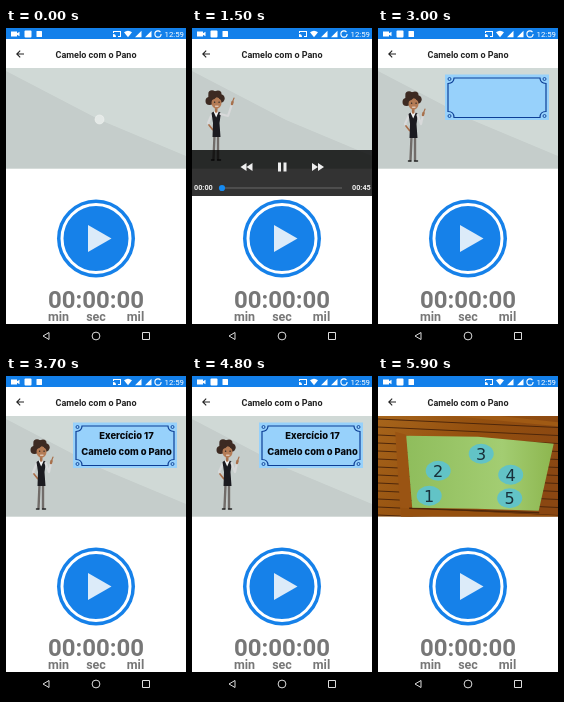
Write an HTML page that moves like this. It is 180 by 320 pixels and loops after 6 s.

```html
<!DOCTYPE html>
<html lang="pt">
<head>
<meta charset="utf-8">
<title>Camelo com o Pano</title>
<style>
html, body { margin: 0; width: 100%; height: 100%; overflow: hidden; background: #fff; }
svg { display: block; width: 100vw; height: 100vh; font-family: Roboto, sans-serif; }
.bold { font-weight: 700; }
.card { font: 800 9.4px Inter, sans-serif; text-anchor: middle; fill: #05080c; }
.time { font-weight: 700; font-size: 7.3px; fill: #eee; }
.num { font: 400 16px "DejaVu Sans", sans-serif; text-anchor: middle; fill: #18303a; }
</style>
</head>
<body>
<svg viewBox="0 0 180 320">
  <defs>
    <clipPath id="frame"><path d="M0 40H180V140.500H0z"/></clipPath>
    <linearGradient id="paper">
      <stop stop-color="#8fbd5c"/><stop offset=".65" stop-color="#a3cd72"/><stop offset="1" stop-color="#8db64f"/>
    </linearGradient>
    <linearGradient id="wood" x2="1" y2=".4">
      <stop stop-color="#a8661c"/><stop offset=".5" stop-color="#94500f"/><stop offset="1" stop-color="#8a4712"/>
    </linearGradient>
  </defs>
  <path fill="#fff" d="M0 0H180V320H0z"/>

  <!-- status bar -->
  <path fill="#1380ea" d="M0 0H180V11H0z"/>
  <g fill="#fff">
    <path d="M5 3.5h6v1.7l2.5-1.5v4.6l-2.5-1.5v1.7h-6z"/>
    <rect x="18.500" y="2.500" width="7" height="7" rx="1"/>
    <rect x="30.500" y="3" width="5.500" height="6" rx=".5"/>
    <path d="M107 3h8v6h-3v-1h2V4h-6v1h-1zM107 6a3 3 0 0 1 3 3h-3z"/>
    <path id="wifi" d="M118 4.200q4-3 8 0L122 9.300z"/>
    <path d="M129 9.200l6.500-6.500v6.500zM139 9.200l6.500-6.500v6.500z"/>
    <circle cx="152" cy="6" r="3.100" fill="none" stroke="#fff" stroke-width="1.100" stroke-dasharray="17 3"/>
    <text x="158.500" y="8.800" font-size="7.800">12:59</text>
  </g>

  <!-- header -->
  <path d="M18 26H11M14.200 22.600L10.800 26l3.400 3.400" fill="none" stroke="#222" stroke-width="1.100"/>
  <text class="bold" x="90" y="29.500" font-size="9" text-anchor="middle" fill="#222">Camelo com o Pano</text>

  <!-- video -->
  <g clip-path="url(#frame)">
    <g id="room">
      <path fill="#d0d9d6" d="M0 40H180V141H0z"/>
      <path fill="#c5cdcb" d="M0 43L94 92 180 128V141H0z"/>
      <g id="panel">
        <path fill="#97d1fb" d="M67 46.500H171V92H67z"/>
        <g id="border" fill="none" stroke="#0d3f96" stroke-width="1.200">
          <path d="M76 50H162q0 5 6 5.500V83.500q-6 0-6 6H76q0-6-6-6V55.500q6-.5 6-5.500z"/>
          <g stroke-width=".900">
            <circle cx="71.500" cy="51" r="1.500"/><circle cx="166.500" cy="51" r="1.500"/>
            <circle cx="71.500" cy="88" r="1.500"/><circle cx="166.500" cy="88" r="1.500"/>
          </g>
        </g>
        <text id="line1" class="card" x="120.500" y="62.500">Exercício 17</text>
        <text id="line2" class="card" x="120.500" y="79">Camelo com o Pano</text>
      </g>
      <g id="woman" stroke-linecap="round" stroke-linejoin="round" fill="none">
        <path d="M22.500 108L21.500 131M26 108L26 131" stroke="#716c69" stroke-width="2.400"/>
        <path d="M19.500 132h2.500M25.500 132h3" stroke="#222" stroke-width="1.500"/>
        <path d="M20 86L16 95L20 101" stroke="#d8d9da" stroke-width="2.200"/>
        <path d="M17 97l3.500 4.500" stroke="#a8704c" stroke-width="1.800"/>
        <path fill="#f0f0f0" d="M20 84.500l4-2 4.500 2v6h-8z"/>
        <path fill="#1b1b20" d="M19.500 85l2-1.500 2.700 6 2.600-6 2.200 1.500-1.500 10 1 14h-8l.5-14z"/>
        <path d="M24.200 79v4.500" stroke="#a8704c" stroke-width="2.600"/>
        <g fill="#3d2a22">
          <circle cx="23" cy="70" r="7"/><circle cx="17.500" cy="73" r="4"/>
          <circle cx="28.500" cy="70.500" r="4.200"/><circle cx="20" cy="66" r="3.700"/>
          <circle cx="26" cy="66" r="3.500"/>
        </g>
        <ellipse cx="24.500" cy="75" rx="5" ry="5.800" fill="#b47b55"/>
        <path d="M19.500 72q4-1 6-4q1 3 4.500 4l-1-5-6-2z" fill="#3d2a22"/>
        <path d="M22.500 74.200h.2M27 74.200h.2" stroke="#222" stroke-width="1.300"/>
        <path d="M23.500 78.200h2.600" stroke="#fff" stroke-width=".8"/>
        <path id="sleeve" stroke="#d8d9da" stroke-width="2.200"/>
        <path id="hand" stroke="#a8704c" stroke-width="2.400"/>
        <path id="finger" stroke="#a8704c" stroke-width="1.100"/>
      </g>
    </g>
    <g id="photo">
      <path fill="url(#wood)" d="M-5 35H185V146H-5z"/>
      <g id="slats" stroke="#4f270a" stroke-width="1.100"></g>
      <path fill="#a05a14" d="M-5 38L60 38 185 50V46L80 35H-5z"/>
      <path fill="#9a5413" d="M16 55L27 58 34 146H22z"/>
      <path fill="#95500f" d="M22 131L185 139V146H22z"/>
      <path d="M30 131.500L160 136" stroke="#4f270a" stroke-width="1.500"/>
      <path fill="url(#paper)" d="M27 59L99 60 174.500 67 159.500 134 98 132 33 131z"/>
      <g id="discs"></g>
    </g>
    <circle id="touch" cx="93.500" cy="91.500" r="4.500" fill="#e4e9e7" stroke="#f2f4f3" stroke-width=".5"/>
  </g>

  <!-- player controls -->
  <g id="controls">
    <path opacity=".8" d="M0 122H180V168H0z"/>
    <g fill="#eee">
      <path d="M54.500 135v8l-6-4zM60.500 135v8l-6-4zM120 135v8l6-4zM126 135v8l6-4z"/>
      <path d="M86 134.500h3v9h-3zM91.500 134.500h3v9h-3z"/>
    </g>
    <path d="M30 160H150" stroke="#686868"/>
    <path id="played" stroke="#1683e8" stroke-width="1.200"/>
    <circle id="knob" cy="160" r="3.100" fill="#168af0"/>
    <text id="clock" class="time" x="2" y="162">00:00</text>
    <text class="time" x="160" y="162">00:45</text>
  </g>

  <!-- start button and stopwatch -->
  <circle cx="90" cy="210.500" r="39" fill="#1681e9"/>
  <circle cx="90" cy="210.500" r="34" fill="none" stroke="#fff" stroke-width="3"/>
  <path fill="#dcebf9" d="M82 197L105.500 210.500 82 224z"/>
  <g class="bold" fill="#777" text-anchor="middle">
    <text x="90" y="279.500" font-size="24">00:00:00</text>
    <g font-size="12.500">
      <text x="52.500" y="293">min</text><text x="90" y="293">sec</text><text x="129.500" y="293">mil</text>
    </g>
  </g>

  <!-- navigation bar -->
  <path d="M0 296H180V320H0z"/>
  <g fill="none" stroke="#ddd">
    <path d="M43 304.500v7l-6-3.500z"/><circle cx="90" cy="308" r="3.900"/><path d="M136.500 304.500h7v7h-7z"/>
  </g>
</svg>
<script>
const $ = id => document.getElementById(id);
const set = (id, attrs) => { for (const k in attrs) $(id).setAttribute(k, attrs[k]); };
const ramp = (t, a, b) => Math.min(1, Math.max(0, (t - a) / (b - a)));
const ease = p => 1 - (1 - p) ** 3;
const mix = (a, b, p) => a + (b - a) * p;
const show = (id, v) => set(id, { opacity: +v });

for (let y = 42; y < 140; y += 8)
  $('slats').innerHTML += `<path d="M-5 ${y}L185 ${y + 9}"/>`;
[[50, 119], [59, 94], [102, 77], [131.5, 98], [130.5, 121.5]].forEach(([x, y], i) => {
  $('discs').innerHTML += `<ellipse cx="${x}" cy="${y}" rx="12.500" ry="10" fill="#62c3c6"/>
    <text class="num" x="${x}" y="${y + 6}">${i + 1}</text>`;
});

function draw(t) {
  show('touch', t < 100);
  show('wifi', t >= 500 && t < 1200 ? 0.6 : 1);
  show('controls', ramp(t, 600, 900) * (1 - ramp(t, 2500, 2800)));

  const knob = mix(30, 33, ramp(t, 1500, 2400));
  set('knob', { cx: knob });
  set('played', { d: `M30 160H${knob}` });
  $('clock').textContent = t < 2000 ? '00:00' : '00:01';

  // she walks in, then steps aside and lowers her hand
  const step = ease(ramp(t, 1600, 2200));
  const x = mix(-48, 0, ease(ramp(t, 1000, 1500))) + 11 * step;
  set('woman', { transform: `translate(${x} ${step})` });
  const ex = mix(36, 32, step), ey = mix(88, 95, step);
  const hx = mix(40, 34, step), hy = mix(76, 86, step);
  set('sleeve', { d: `M28.500 86L${ex} ${ey}L${hx} ${hy}` });
  set('hand', { d: `M${hx} ${hy}l.5-2` });
  set('finger', { d: `M${hx + 0.5} ${hy - 2}l1.500-4` });

  set('panel', { transform: `translate(${mix(115, 0, ease(ramp(t, 1600, 2200)))} 0)` });
  show('border', ramp(t, 2500, 3000));
  show('line1', ramp(t, 3000, 3300));
  show('line2', ramp(t, 3200, 3600));

  show('photo', t >= 5000);
  const drift = ramp(t, 5200, 5900);
  set('photo', { transform: `translate(${1.2 * drift} ${0.8 * drift})` });
}

function tick(now) {
  draw(Math.floor(now % 6000 / 100) * 100);
  requestAnimationFrame(tick);
}
draw(0);
requestAnimationFrame(tick);
</script>
</body>
</html>
```
